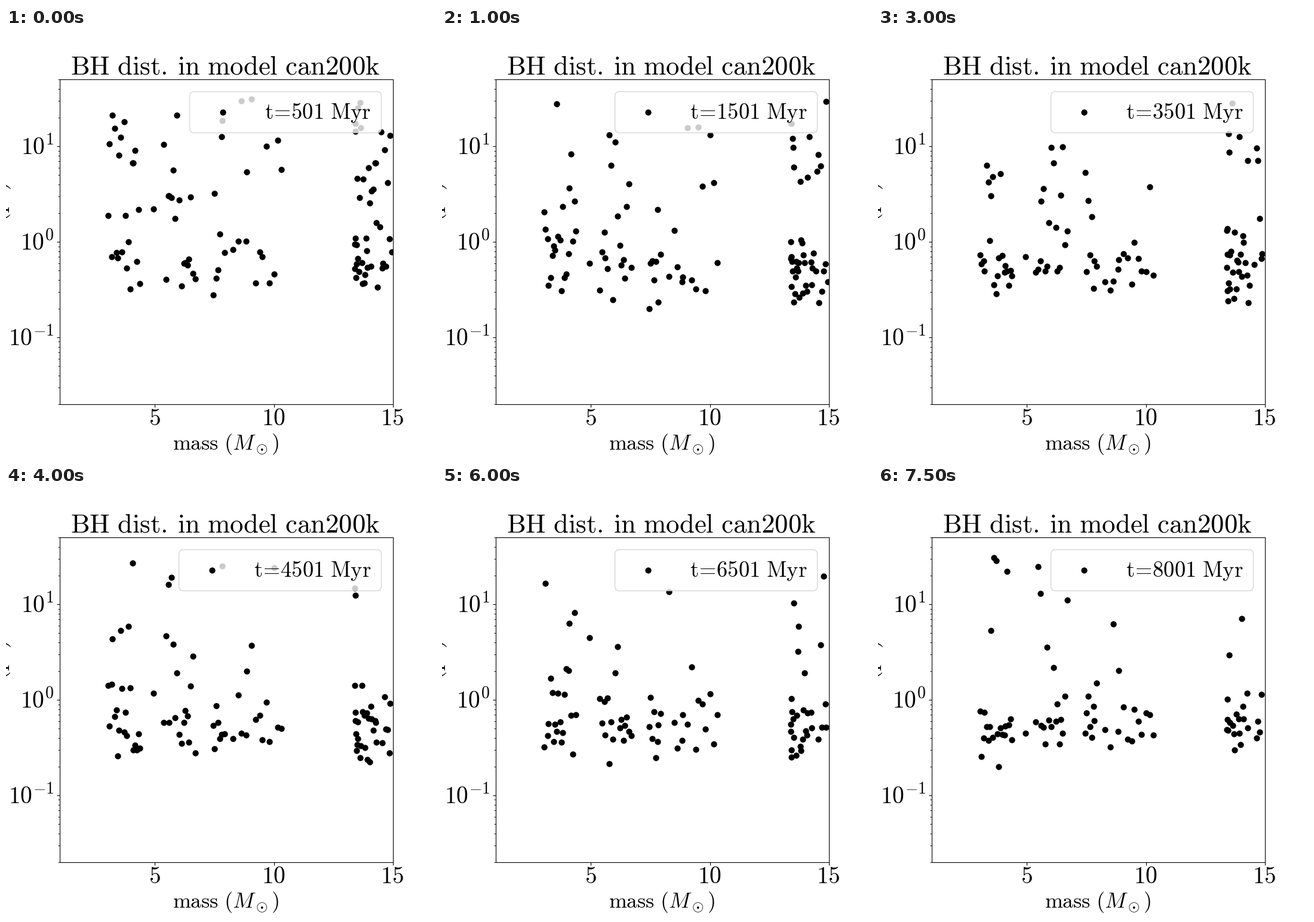
A matplotlib script that plays this animation: 720 px wide and 720 px high, repeating every 8000 ms.

```python
import numpy as np
import matplotlib.pyplot as plt
from matplotlib.animation import FuncAnimation
from matplotlib.patches import FancyBboxPatch

SIZE, DPI = 720, 100
FRAMES, STEP_MS = 16, 500
LEFT, RIGHT, TOP, BOTTOM = 90, 648, 86.4, 630
DOT = dict(color="black", s=41)

plt.rcParams["mathtext.fontset"] = "cm"


def spread(count, low, high, power=1):
    """Slightly uneven masses from low to high, crowded near low if power > 1."""
    u = np.linspace(0, 1, count)
    u[1:-1] += rng.uniform(-0.5, 0.5, count - 2) / count
    return low + (high - low) * u ** power


rng = np.random.default_rng(8)
light = np.concatenate([spread(21, 3.03, 4.37), [4.94],
                        spread(17, 5.37, 6.7), spread(8, 7.45, 7.92),
                        spread(14, 8.28, 10.32)])
heavy = spread(42, 13.4, 14.96, 1.7)
mass = np.concatenate([light, heavy])

# Heavy holes are ejected one by one; the heaviest goes first.
life = np.full(mass.size, np.inf)
life[light.size:] = rng.uniform(4, 25, heavy.size)
life[-1] = 4


def radii(i):
    """Most holes sit in a dense core, a shrinking share in a wide halo."""
    rng = np.random.default_rng(100 + i)
    halo_share = 0.17 + 0.5 * np.exp(-(i + 1) / 5)
    core = np.clip(rng.normal(-0.28, 0.16, mass.size), -0.7, 0.15)
    halo = -0.05 + 1.58 * rng.random(mass.size) ** 1.2
    return 10 ** np.where(rng.random(mass.size) < halo_share, halo, core)


fig = plt.figure(figsize=(SIZE / DPI, SIZE / DPI), dpi=DPI, facecolor="white")
ax = fig.add_axes([LEFT / SIZE, 1 - BOTTOM / SIZE,
                   (RIGHT - LEFT) / SIZE, (BOTTOM - TOP) / SIZE])
ax.set_yscale("log")
ax.set(xlim=(1, 15), ylim=(0.02, 50), xticks=[5, 10, 15])
ax.tick_params(which="both", labelbottom=False, labelleft=False)
dots = ax.scatter(mass, radii(0), **DOT)

# Overlay in stage pixels for lettering and the legend.
stage = fig.add_axes([0, 0, 1, 1])
stage.set(xlim=(0, SIZE), ylim=(SIZE, 0))
stage.axis("off")


def label(x, y, tex, size, ha="center", va="baseline", **kw):
    return stage.text(x, y, f"${tex}$", fontsize=size, ha=ha, va=va, **kw)


label(367.5, 77, r"\mathrm{BH\ dist.\:in\ model\ can200k}", 32.2)
label(368, 706, r"\mathrm{mass}\ (M_\odot)", 25.8)
label(11, 259, r"\mathrm{radius\ (pc)}", 27.5, "right", "top", rotation=90)
for m in (5, 10, 15):
    label(LEFT + (m - 1) * (RIGHT - LEFT) / 14 - 1, 665, m, 28.5)
for power in (1, 0, -1):
    label(80.5, 371.5 - 160 * power, f"10^{{{power}}}", 28.5, "right")

box = FancyBboxPatch((308, 106.5), 320.5, 69, linewidth=1, alpha=0.8,
                     boxstyle="round,pad=0,rounding_size=7.8",
                     facecolor="white", edgecolor="0.8")
stage.add_patch(box)
key = stage.scatter([363], [141], zorder=3, **DOT)
clock = label(611.5, 152, "t", 26.3, "right")


def update(i):
    alive = i < life
    dots.set_offsets(np.column_stack([mass, radii(i)])[alive])
    t = 501 + 500 * i
    left = 307.5 if t < 1000 else 289.5
    box.set_bounds(left, 106.5, 628.5 - left, 69)
    key.set_offsets([[left + 55.8, 141]])
    clock.set_text(rf"$\mathrm{{t\!=\!{t}\ Myr}}$")
    return dots, box, key, clock


anim = FuncAnimation(fig, update, frames=FRAMES, interval=STEP_MS,
                     repeat=True, repeat_delay=0, blit=False)
plt.show()
```
